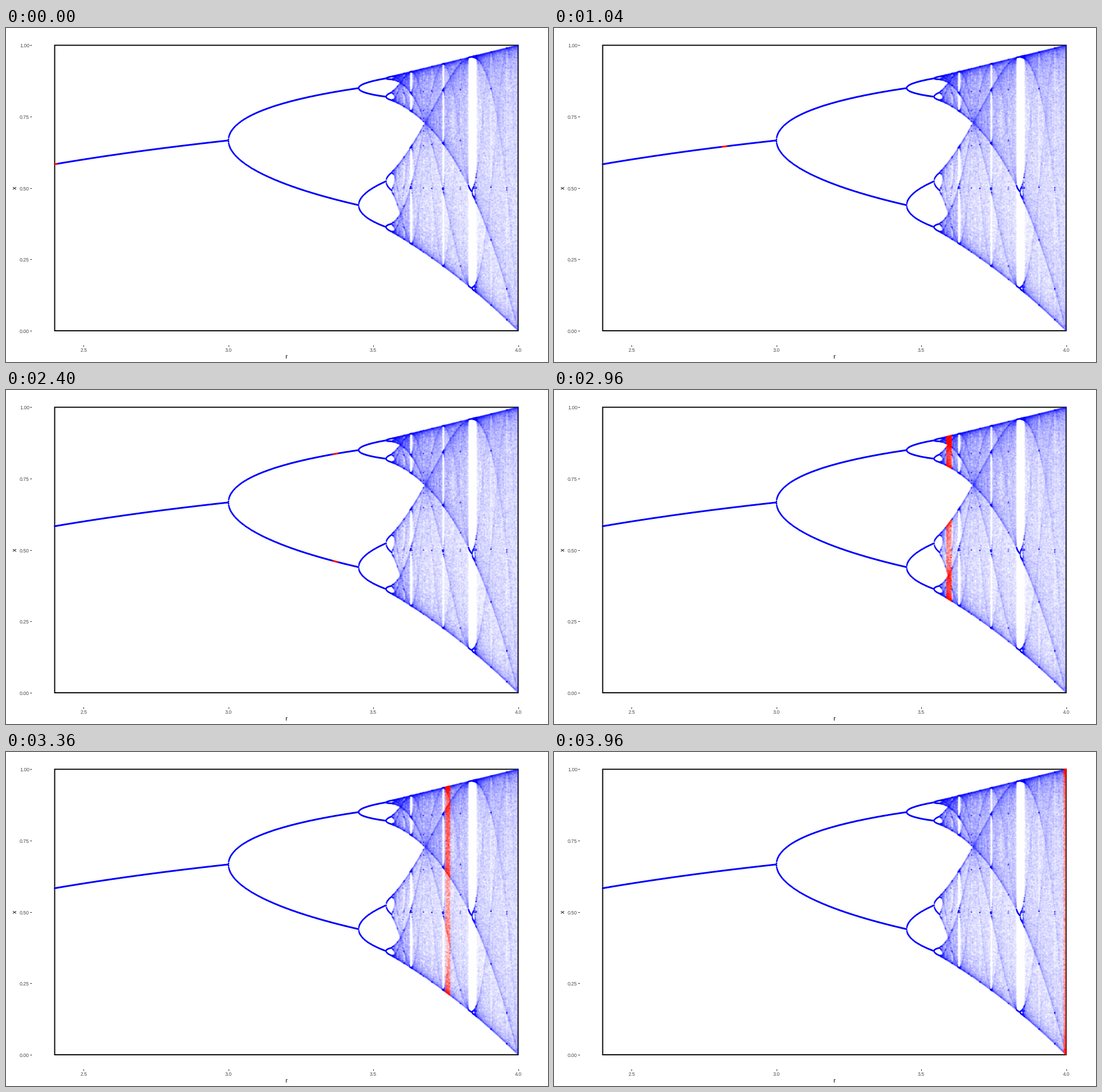
A matplotlib script that plays this animation: 952 by 588 pixels, repeating every 4000 ms.

```python
import numpy as np
import matplotlib.pyplot as plt
from matplotlib.animation import FuncAnimation
from matplotlib.patches import Rectangle

W, H, DPI = 952, 588, 100
PT = 72 / DPI                    # one pixel in points
LEFT, RIGHT, TOP, BOTTOM = 85.5, 899.5, 30.4, 533
R0, R1 = 2.4, 4.0
FRAMES, INTERVAL = 100, 40
SS = 3                           # subpixels per pixel
RADIUS = 1.4                     # dot radius in pixels
STRIP, EDGE = 16, 4              # repainted columns and spare ones beside them
BLUE, RED = (0, 0, 1), (1, 0, 0)
BLUE_ALPHA, RED_ALPHA = 0.0155, 0.045


def px(r):
    return LEFT + (r - R0) / (R1 - R0) * (RIGHT - LEFT)


def py(x):
    return BOTTOM + x * (TOP - BOTTOM)


def orbits(r, skip=3000, keep=600):
    """Points the logistic map visits once it has settled."""
    x = np.full_like(r, 0.3)
    for _ in range(skip):
        x = r * x * (1 - x)
    rows = []
    for _ in range(keep):
        x = r * x * (1 - x)
        rows.append(x)
    return np.array(rows)


rs = np.round(np.arange(1601) * 0.001 + R0, 3)
dot_x = px(rs)
dot_y = py(orbits(rs))


def splat(pick, x0, width, color, alpha):
    """RGBA strip of translucent round dots, starting at pixel column x0."""
    w, h = width * SS, H * SS
    ys = dot_y[:, pick]
    col = np.broadcast_to(np.floor((dot_x[pick] - x0) * SS).astype(int), ys.shape)
    row = np.floor(ys * SS).astype(int)
    ok = (col >= 0) & (col < w)
    hits = np.bincount(row[ok] * w + col[ok], minlength=w * h)
    hits = hits.reshape(h, w).astype(np.float32)
    pad = int(np.ceil(RADIUS * SS))
    wide = np.pad(hits, pad)
    total = np.zeros_like(hits)
    for dy in range(-pad, pad + 1):
        for dx in range(-pad, pad + 1):
            if dx * dx + dy * dy <= (RADIUS * SS) ** 2:
                total += wide[pad + dy:pad + dy + h, pad + dx:pad + dx + w]
    cover = 1 - (1 - alpha) ** total
    image = np.empty((H, width, 4), np.float32)
    image[..., :3] = color
    image[..., 3] = cover.reshape(H, SS, width, SS).mean(axis=(1, 3))
    return image


fig = plt.figure(figsize=(W / DPI, H / DPI), dpi=DPI, facecolor="white")
ax = fig.add_axes([0, 0, 1, 1])
ax.set_axis_off()

ax.add_patch(Rectangle((LEFT, TOP), RIGHT - LEFT, BOTTOM - TOP, fill=False,
                       ec="black", lw=1.9 * PT, snap=False, zorder=1))


def label(x, y, text, size, color, ha="center", rotation=0):
    ax.text(x, y, text, fontsize=size * PT, color=color, ha=ha,
            va="center_baseline" if not rotation else "center",
            rotation=rotation, family="Liberation Sans")


def tick(xs, ys):
    ax.plot(xs, ys, color="#333333", lw=1.07 * PT, solid_capstyle="butt")


for v in (0, 0.25, 0.5, 0.75, 1):
    tick([42.3, 45], [py(v)] * 2)
    label(41, py(v) + 0.5, f"{v:.2f}", 8.8, "#4d4d4d", ha="right")
for v in (2.5, 3, 3.5, 4):
    tick([px(v)] * 2, [558, 560.7])
    label(px(v), 566, f"{v:.1f}", 8.8, "#4d4d4d")
label(492.5, 578, "r", 11, "black")
label(16, 281.7, "x", 11, "black", rotation=90)

base = splat(np.full(rs.shape, True), 0, W, BLUE, BLUE_ALPHA)
cloud = ax.imshow(base, extent=(0, W, H, 0), interpolation="nearest",
                  aspect="auto", zorder=3)
band = ax.imshow(np.zeros((H, STRIP, 4)), extent=(0, STRIP, H, 0),
                 interpolation="nearest", aspect="auto", zorder=4)
ax.set_xlim(0, W)
ax.set_ylim(H, 0)


def update(i):
    step = (R1 - R0) / (FRAMES - 1)
    center = R0 + i * step
    near = np.abs(rs - center) <= step / 2
    beside = (np.abs(rs - center) <= 3 * step) & ~near
    x0 = int(px(center)) - STRIP // 2
    # dots in the band turn from blue to red
    rest = splat(beside, x0 - EDGE, STRIP + 2 * EDGE, BLUE, BLUE_ALPHA)
    image = base.copy()
    image[:, x0:x0 + STRIP] = rest[:, EDGE:-EDGE]
    cloud.set_data(image)
    band.set_data(splat(near, x0, STRIP, RED, RED_ALPHA))
    band.set_extent((x0, x0 + STRIP, H, 0))
    return cloud, band


anim = FuncAnimation(fig, update, frames=FRAMES, interval=INTERVAL,
                     init_func=lambda: update(0), repeat=True, repeat_delay=0)
plt.show()
```
